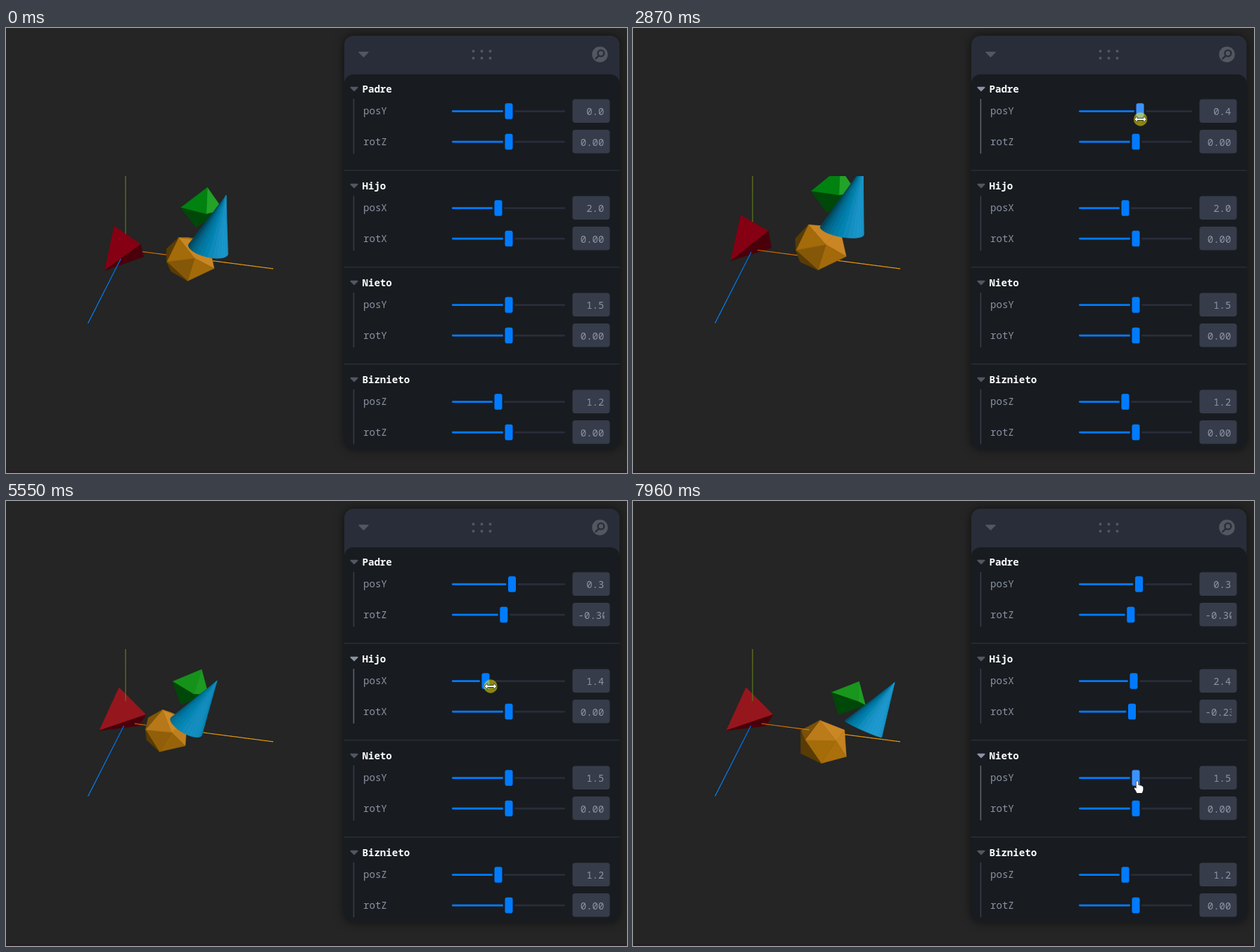
Animation of 883 by 634 pixels, one loop 8000 ms. Source, as an HTML page with a canvas:

```html
<!DOCTYPE html>
<html lang="es">
<head>
<meta charset="utf-8">
<style>
  html, body { margin: 0; width: 100%; height: 100%; overflow: hidden; background: #242524; }
  canvas { display: block; }
</style>
</head>
<body>
<canvas id="stage" width="883" height="634"></canvas>
<script>
const ctx = document.getElementById('stage').getContext('2d');
const LOOP = 8000;

// ---------- timeline: [time, value] pairs, linear in between ----------
const tracks = {
  posY: [[1060, 0], [1520, -1], [1760, -1.4], [2060, -1.3], [2200, 0.1], [2500, 2.8], [2880, 0.3]],
  rotZ: [[3200, 0], [3340, 0.03], [3470, -0.25], [3610, -0.25], [3700, -0.3]],
  posX: [[4450, 2], [4750, 2.7], [4820, 3.1], [4880, 3], [5350, 1.1], [5750, 1.6], [6010, 2.4]],
  rotX: [[6350, 0], [6490, -0.27], [6590, -0.42], [6880, 0.65], [7020, 0.55], [7260, -0.47], [7470, -0.23]],
  cursorX: [[250, 834], [320, 800], [460, 800], [1000, 716], [2930, 719], [3130, 716], [3880, 709],
            [4140, 709], [4420, 706], [6020, 716], [6220, 716], [6330, 714], [7490, 709], [7690, 709], [7820, 717], [7960, 717]],
  cursorY: [[250, 590], [320, 571], [460, 571], [1000, 121], [1520, 123], [2200, 130], [2930, 130], [3130, 173],
            [3880, 173], [4140, 173], [4420, 264], [6020, 264], [6220, 264], [6330, 302], [7490, 302],
            [7690, 302], [7820, 434], [7950, 399]]
};
const drags = [
  { from: 1040, to: 2900, key: 'posY', offset: 0.5 },
  { from: 3180, to: 3880, key: 'rotZ', offset: 1 },
  { from: 4440, to: 6020, key: 'posX', offset: 7 },
  { from: 6340, to: 7490, key: 'rotX', offset: -1 }
];

function sample(keys, t) {
  const next = keys.findIndex(k => k[0] > t);
  if (next < 0) return keys[keys.length - 1][1];
  if (next === 0) return keys[0][1];
  const [t0, a] = keys[next - 1], [t1, b] = keys[next];
  return a + (b - a) * (t - t0) / (t1 - t0);
}

// ---------- 3D scene ----------
const VIEW = { x: 170, y: 315.5, focal: 193, dist: 4.66, right: 380, top: 211, height: 209.5 };
const azimuth = 0.2522, elevation = 0.5323;
const [sa, ca, se, ce] = [Math.sin(azimuth), Math.cos(azimuth), Math.sin(elevation), Math.cos(elevation)];
const axisRight = [ca, 0, -sa], axisUp = [-sa * se, ce, -ca * se], axisBack = [sa * ce, se, ca * ce];

const add = (a, b) => a.map((v, i) => v + b[i]);
const sub = (a, b) => a.map((v, i) => v - b[i]);
const scale = (a, k) => a.map(v => v * k);
const dot = (a, b) => a[0] * b[0] + a[1] * b[1] + a[2] * b[2];
const cross = (a, b) => [a[1] * b[2] - a[2] * b[1], a[2] * b[0] - a[0] * b[2], a[0] * b[1] - a[1] * b[0]];
const unit = a => scale(a, 1 / Math.hypot(...a));
const camera = scale(axisBack, VIEW.dist);
const light = unit([1, 2.4, 1.2]);

function project(p) {
  const w = VIEW.dist - dot(p, axisBack), k = VIEW.focal / w;
  return { x: VIEW.x + k * dot(p, axisRight), y: VIEW.y - k * dot(p, axisUp), w };
}
function rotateX([x, y, z], a) {
  const c = Math.cos(a), s = Math.sin(a);
  return [x, c * y - s * z, s * y + c * z];
}
function rotateZ([x, y, z], a) {
  const c = Math.cos(a), s = Math.sin(a);
  return [c * x - s * y, s * x + c * y, z];
}

const normalOf = ([a, b, c]) => cross(sub(b, a), sub(c, a));
const outward = f => dot(normalOf(f), add(add(f[0], f[1]), f[2])) < 0 ? [f[0], f[2], f[1]] : f;

// Regular solid with triangular faces: every triple of mutually nearest vertices.
function solid(points, radius) {
  const v = points.map(p => scale(unit(p), radius));
  const gap = (a, b) => Math.hypot(...sub(a, b));
  const edge = Math.min(...v.slice(1).map(p => gap(v[0], p))) * 1.01;
  const faces = [];
  for (let i = 0; i < v.length; i++)
    for (let j = i + 1; j < v.length; j++)
      for (let k = j + 1; k < v.length; k++)
        if (gap(v[i], v[j]) < edge && gap(v[j], v[k]) < edge && gap(v[i], v[k]) < edge)
          faces.push(outward([v[i], v[j], v[k]]));
  return faces;
}
function cone(radius, height, sides) {
  const rim = i => {
    const a = i / sides * 2 * Math.PI;
    return [radius * Math.sin(a), -height / 2, radius * Math.cos(a)];
  };
  const faces = [];
  for (let i = 0; i < sides; i++)
    for (const apex of [height / 2, -height / 2])
      faces.push(outward([[0, apex, 0], rim(i), rim(i + 1)]));
  return faces;
}

const PHI = (1 + Math.sqrt(5)) / 2, signs = [1, -1];
const icosaPoints = signs.flatMap(a => signs.flatMap(b =>
  [[0, a, b * PHI], [a, b * PHI, 0], [a * PHI, 0, b]]));
const octaPoints = signs.flatMap(s => [[s, 0, 0], [0, s, 0], [0, 0, s]]);
const tetraPoints = [[1, 1, 1], [-1, -1, 1], [-1, 1, -1], [1, -1, -1]];

const meshes = [
  { faces: solid(tetraPoints, 1), color: [164, 0, 25], level: 0 },
  { faces: solid(icosaPoints, 0.75), color: [200, 131, 12], level: 1 },
  { faces: solid(octaPoints, 0.5), color: [0, 160, 20], level: 2 },
  { faces: cone(0.35, 1, 32), color: [0, 158, 214], level: 3 }
];
const axes = [
  { dir: [1, 0, 0], near: '#c85800', far: '#e8960c' },
  { dir: [0, 1, 0], near: '#4c781c', far: '#7c7820' },
  { dir: [0, 0, 1], near: '#006cf0', far: '#0888ff' }
];

function shade(color, normal) {
  const s = 0.17 + 0.894 * Math.max(0, dot(normal, light));
  const gloss = 0.012 * Math.max(0, (s - 0.7) / 0.3);
  return `rgb(${color.map(c => Math.round(255 * Math.min(1, (c / 255) ** 2.2 * s + gloss) ** (1 / 2.2)))})`;
}

function hides([a, b, c], p) {
  const area = (b.x - a.x) * (c.y - a.y) - (c.x - a.x) * (b.y - a.y);
  const u = ((p.x - a.x) * (c.y - a.y) - (c.x - a.x) * (p.y - a.y)) / area;
  const v = ((b.x - a.x) * (p.y - a.y) - (p.x - a.x) * (b.y - a.y)) / area;
  return u >= 0 && v >= 0 && u + v <= 1 && (1 - u - v) / a.w + u / b.w + v / c.w > 1 / p.w;
}

function drawScene({ posY, rotZ, posX, rotX }) {
  const padre = p => add(rotateZ(p, rotZ), [0, posY, 0]);
  const hijo = p => padre(add(rotateX(p, rotX), [posX, 0, 0]));
  const nieto = p => hijo(add(p, [0, 1.5, 0]));
  const biznieto = p => nieto(add(p, [0, 0, 1.2]));
  const places = [padre, hijo, nieto, biznieto];

  ctx.save();
  ctx.beginPath();
  ctx.rect(0, VIEW.top, VIEW.right, VIEW.height);
  ctx.clip();
  ctx.lineJoin = 'round';

  const drawn = [];
  const depth = m => dot(places[m.level]([0, 0, 0]), axisBack);
  for (const mesh of [...meshes].sort((a, b) => depth(a) - depth(b))) {
    for (const face of mesh.faces) {
      const world = face.map(places[mesh.level]);
      const normal = unit(normalOf(world));
      if (dot(normal, sub(camera, world[0])) <= 0) continue;
      const tri = world.map(project);
      drawn.push(tri);
      ctx.fillStyle = ctx.strokeStyle = shade(mesh.color, normal);
      ctx.lineWidth = 0.6;
      ctx.beginPath();
      tri.forEach(p => ctx.lineTo(p.x, p.y));
      ctx.closePath();
      ctx.fill();
      ctx.stroke();
    }
  }

  const start = project([0, 0, 0]);
  for (const { dir, near, far } of axes) {
    const end = project(scale(dir, 3));
    const ink = ctx.createLinearGradient(start.x, start.y, end.x, end.y);
    ink.addColorStop(0, near);
    ink.addColorStop(1, far);
    ctx.strokeStyle = ink;
    ctx.lineWidth = 1.2;
    ctx.beginPath();
    let pen = false;
    for (let i = 0; i <= 220; i++) {
      const p = project(scale(dir, i / 50));
      const seen = !drawn.some(tri => hides(tri, p));
      if (seen) pen ? ctx.lineTo(p.x, p.y) : ctx.moveTo(p.x, p.y);
      pen = seen;
    }
    ctx.stroke();
  }
  ctx.restore();
}

// ---------- control panel ----------
const FONT = '14.1px "Noto Sans Mono", "DejaVu Sans Mono", monospace';
const TRACK = { left: 634, right: 795, start: 640, travel: 150 };
const row = (label, key, min, max, digits, value) => ({ label, key, min, max, digits, value });
const groups = [
  ['Padre', row('posY', 'posY', -5, 5, 1), row('rotZ', 'rotZ', -Math.PI, Math.PI, 2)],
  ['Hijo', row('posX', 'posX', 0, 5, 1), row('rotX', 'rotX', -Math.PI, Math.PI, 2)],
  ['Nieto', row('posY', '', 0, 3, 1, 1.5), row('rotY', '', -Math.PI, Math.PI, 2, 0)],
  ['Biznieto', row('posZ', '', 0, 3, 1, 1.2), row('rotZ', '', -Math.PI, Math.PI, 2, 0)]
].map(([title, ...rows], i) => {
  const y = 87 + 138 * i;
  rows.forEach((r, j) => r.y = y + 31.5 + 43.5 * j);
  return { title, y, rows };
});
const allRows = groups.flatMap(g => g.rows);

function box(x, y, w, h, radius, fill) {
  ctx.fillStyle = fill;
  ctx.beginPath();
  ctx.roundRect(x, y, w, h, radius);
  ctx.fill();
}
function disc(x, y, r, fill) {
  ctx.fillStyle = fill;
  ctx.beginPath();
  ctx.arc(x, y, r, 0, 2 * Math.PI);
  ctx.fill();
}
function downArrow(x, y, w, h, fill) {
  ctx.fillStyle = ctx.strokeStyle = fill;
  ctx.lineWidth = 1.5;
  ctx.lineJoin = 'round';
  ctx.beginPath();
  ctx.moveTo(x - w / 2, y - h / 2);
  ctx.lineTo(x + w / 2, y - h / 2);
  ctx.lineTo(x, y + h / 2);
  ctx.closePath();
  ctx.fill();
  ctx.stroke();
}
function write(text, x, y, fill, weight = 400) {
  ctx.font = `${weight} ${FONT}`;
  ctx.fillStyle = fill;
  ctx.fillText(text, x, y);
}

const valueOf = (r, state) => r.key ? state[r.key] : r.value;
const handleX = (r, state) => TRACK.start + TRACK.travel * (valueOf(r, state) - r.min) / (r.max - r.min);

function drawRow(r, state, cursor) {
  const x = handleX(r, state), y = r.y;
  const lit = cursor && Math.abs(cursor.x - x) < 6.5 && Math.abs(cursor.y - y) < 12;
  write(r.label, 508, y + 4.5, '#8c92a4');
  box(TRACK.left, y - 1.3, TRACK.right - TRACK.left, 2.8, 1.4, '#292d39');
  box(TRACK.left, y - 1.3, x - TRACK.left, 2.8, 1.4, '#007bff');
  box(x - 8.3, y - 14, 16.6, 28, 4, '#181c20');
  box(x - 5.5, y - 11.2, 11, 22.4, 2.8, lit ? '#3c93ff' : '#007bff');

  box(805.5, y - 17, 53, 33.5, 4, '#373c4b');
  const value = valueOf(r, state).toFixed(r.digits).replace(/^-(0\.?0*)$/, '$1');
  ctx.save();
  ctx.beginPath();
  ctx.rect(812, y - 16, 39, 32);
  ctx.clip();
  ctx.textAlign = value.length > 4 ? 'left' : 'right';
  write(value, value.length > 4 ? 813.5 : 850.5, y + 5.5, '#8c92a4');
  ctx.restore();
}

function drawPanel(state, cursor) {
  ctx.save();
  ctx.shadowColor = 'rgba(0,0,0,.55)';
  ctx.shadowBlur = 14;
  box(481, 11, 391.5, 589, 13, '#181c20');
  ctx.restore();
  box(481, 11, 391.5, 67, [13, 13, 0, 0], '#292d39');
  box(481, 66, 391.5, 534, 13, '#181c20');

  downArrow(508.5, 37.7, 13, 6.5, '#535760');
  for (const x of [664.5, 676.5, 688.5]) for (const y of [33, 43]) disc(x, y, 2, '#535760');
  disc(844.5, 37.7, 11.2, '#535760');
  ctx.strokeStyle = '#292d39';
  ctx.lineWidth = 2.4;
  ctx.lineCap = 'round';
  ctx.beginPath();
  ctx.arc(846, 36, 4.4, 0, 2 * Math.PI);
  ctx.moveTo(842.6, 39.6);
  ctx.lineTo(838.6, 43.6);
  ctx.stroke();
  ctx.lineCap = 'butt';

  groups.forEach((g, i) => {
    const hover = cursor && cursor.y > g.y - 21 && cursor.y < g.y + 116;
    downArrow(495, g.y, 9.6, 4.8, hover ? '#8c92a4' : '#535760');
    write(g.title, 506.5, g.y + 5, '#fefefe', 600);
    box(493.6, g.y + 14, 1.6, 78, 0, hover ? '#5d616b' : '#373c4b');
    if (i) box(481, g.y - 23, 391.5, 1.4, 0, '#292d39');
    g.rows.forEach(r => drawRow(r, state, cursor));
  });
}

// ---------- mouse pointer ----------
const ARROW = new Path2D('M0 0V16L3.8 12.5L6.3 18.2L8.8 17.1L6.3 11.6H11.5Z');
const HAND = new Path2D('M-1.3 1Q0 -.8 1.3 1V6Q3 5 3.8 6.5Q5.6 5.8 6.2 7.3Q8.3 7 8.3 9.2V12.5Q8 14.5 6.8 17H-.5Q-1.8 14 -4.2 10.5Q-4.3 8.4 -1.3 10.5Z');
const RESIZE = new Path2D('M-8.3 0L-4.6 -3.7V-1.1H4.6V-3.7L8.3 0L4.6 3.7V1.1H-4.6V3.7Z');

function drawCursor({ x, y, pressed, hand }) {
  if (pressed) disc(x, y, 9.7, 'rgba(255,240,0,.5)');
  const shape = pressed ? RESIZE : hand ? HAND : ARROW;
  ctx.save();
  ctx.translate(x, y);
  ctx.strokeStyle = '#222';
  ctx.lineWidth = 1.2;
  ctx.stroke(shape);
  ctx.fillStyle = '#fff';
  ctx.fill(shape);
  ctx.restore();
}

function cursorAt(t, state) {
  if (t < 250) return null;
  const drag = drags.find(d => t >= d.from && t < d.to);
  const x = drag
    ? handleX(allRows.find(r => r.key === drag.key), state) + drag.offset
    : sample(tracks.cursorX, t);
  const y = sample(tracks.cursorY, t);
  const hand = allRows.some(r => Math.abs(y - r.y) < 13 && x > TRACK.left && x < TRACK.right);
  return { x, y, pressed: !!drag, hand };
}

function stateAt(t) {
  const step = (key, n) => Math.round(sample(tracks[key], t) * n) / n;
  return { posY: step('posY', 10), rotZ: step('rotZ', 100), posX: step('posX', 10), rotX: step('rotX', 100) };
}

function frame(now) {
  const t = now % LOOP;
  const state = stateAt(t), cursor = cursorAt(t, state);
  ctx.fillStyle = '#242524';
  ctx.fillRect(0, 0, 883, 634);
  ctx.fillStyle = '#261d25';
  ctx.fillRect(0, 631, 883, 3);
  drawScene(state);
  drawPanel(state, cursor);
  if (cursor) drawCursor(cursor);
  requestAnimationFrame(frame);
}
requestAnimationFrame(frame);
</script>
</body>
</html>
```
